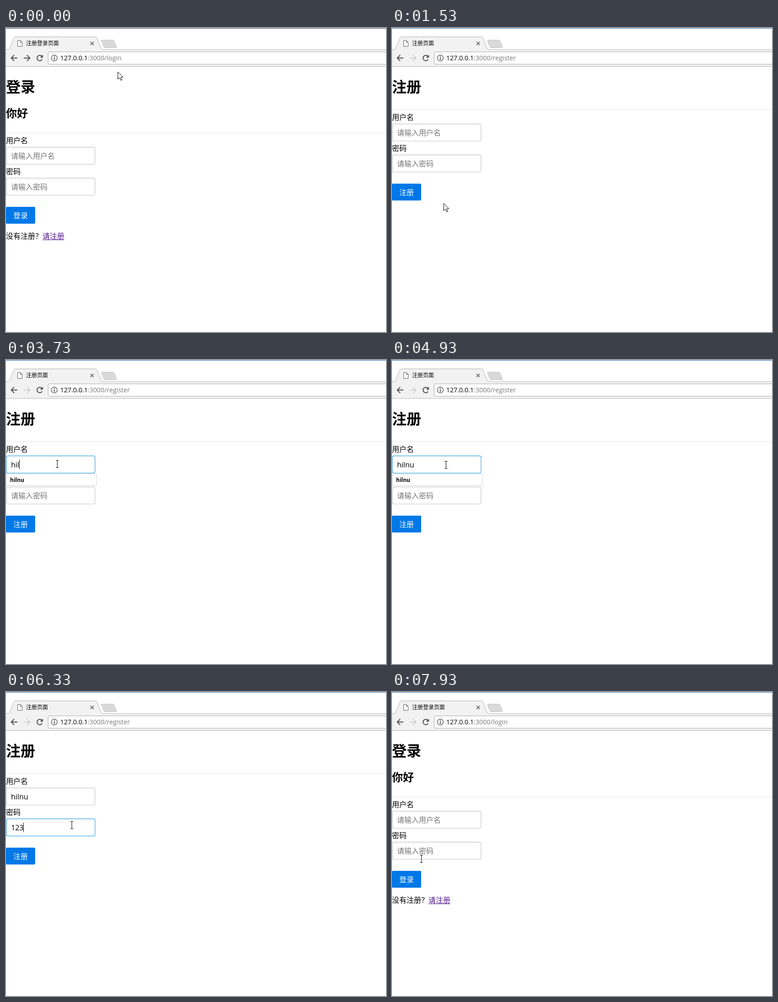
An HTML page with a canvas for the animation above (8000 ms loop, 834 by 668 pixels).

```html
<!DOCTYPE html>
<html lang="zh-CN">
<head>
<meta charset="utf-8">
<title>注册登录</title>
<style>
  html, body { margin: 0; width: 100%; height: 100%; overflow: hidden; background: #fff; }
  canvas { display: block; }
</style>
</head>
<body>
<canvas id="stage" width="834" height="668"></canvas>
<script>
const ctx = document.getElementById('stage').getContext('2d');
const LOOP = 8000, TICK = 1000 / 15, CARET_PERIOD = 530;
const USER = 'hilnu', PASSWORD = '123';
const REGISTER_AT = 1300, LOGIN_AT = 7400;

// Pointer stops: time, x, y
const stops = [
  [0, 245, 96], [60, 245, 96], [933, 119, 466], [1133, 118, 457], [1260, 118, 457],
  [1933, 103, 258], [2067, 112, 228], [4900, 112, 228], [5200, 289, 284],
  [5270, 288, 283], [5533, 144, 292], [6330, 144, 292], [6560, 285, 270],
  [6730, 170, 372], [6800, 130, 366], [7067, 57, 362], [7270, 57, 363], [7933, 64, 366], [8000, 64, 366]
];
const userField = { text: USER, hint: '请输入用户名', focus: 2200, blur: 5270, keys: [3330, 3530, 3730, 3930, 4130] };
const passField = { text: PASSWORD, hint: '请输入密码', focus: 5730, blur: 6600, keys: [6000, 6200, 6330] };

const shapes = {
  arrow: new Path2D('M0 0V16L4 12.5L6.5 18.5L9 17.5L6.5 11.5H11.5Z'),
  hand: new Path2D('M-1.5 13V1.5Q0-1 1.5 1.5V7.5Q3.5 5.5 4.5 8Q6.5 6.5 7.5 9Q9.5 7.5 10.5 10.5V15Q10.5 18 8.5 20Q7 22.5 3 22.5Q-1 22.5-2.5 19L-5.5 14Q-6 11-4 11.5Z'),
  knuckles: new Path2D('M1.5 7.5V11M4.5 8V12M7.5 9V12'),
  beam: new Path2D('M-3-8H3M0-8V8M-3 8H3')
};

function text(str, x, y, size = 16, color = '#000', weight = 400) {
  ctx.font = `${weight} ${size}px "Open Sans", "Noto Sans CJK SC", sans-serif`;
  ctx.fillStyle = color;
  ctx.fillText(str, x, y);
  return ctx.measureText(str).width;
}
function rect(x, y, w, h, color) {
  ctx.fillStyle = color;
  ctx.fillRect(x, y, w, h);
}
function line(d, color, width = 1, fill) {
  const path = new Path2D(d);
  if (fill) { ctx.fillStyle = fill; ctx.fill(path); }
  ctx.strokeStyle = color;
  ctx.lineWidth = width;
  ctx.stroke(path);
}
function roundBox(x, y, w, h, r, stroke, fill = '#fff') {
  ctx.beginPath();
  ctx.roundRect(x, y, w, h, r);
  ctx.fillStyle = fill;
  ctx.fill();
  if (stroke) { ctx.strokeStyle = stroke; ctx.lineWidth = 1; ctx.stroke(); }
}

function pointerAt(t) {
  const i = stops.findIndex((s, n) => n && t <= s[0]);
  const [t0, x0, y0] = stops[i - 1], [t1, x1, y1] = stops[i];
  const p = (t - t0) / (t1 - t0), e = p * p * (3 - 2 * p);
  return { x: Math.round(x0 + (x1 - x0) * e), y: Math.round(y0 + (y1 - y0) * e) };
}
const inside = (p, x, y, w, h) => p.x >= x && p.x < x + w && p.y >= y && p.y < y + h;

function browser(title, path, canForward, active) {
  rect(0, 0, 834, 1, active ? '#1a65a6' : '#2b3a4b');
  rect(0, 47, 834, 37, '#f2f2f2');
  rect(0, 47, 834, 1, '#b5b5b5');
  rect(0, 84, 834, 1, '#b5b5b5');
  line('M4 47.5Q7 47.5 8 45L17.5 22Q18.5 19.5 21 19.5H196Q198.5 19.5 199.5 22L209 45Q210 47.5 213 47.5', '#b0b0b0', 1, '#f2f2f2');
  rect(6, 47, 205, 2, '#f2f2f2');
  line('M211 26.5H234Q236.5 26.5 237.5 29L242.5 41Q243 43.5 241 43.5H218Q215.5 43.5 214.5 41L209.5 29Q209 26.5 211 26.5Z', '#c6c6c6', 1, '#d9d9d9');
  line('M25.5 27.5H31.5L35.5 31.5V40.5H25.5ZM31.5 27.5V31.5H35.5', '#5a5a5a', 1, '#fff');
  line('M185.5 30.5L192.5 37.5M192.5 30.5L185.5 37.5', '#5a5a5a', 1.7);
  text(title, 44, 38, 12);

  line('M25 66H12M18 59.5L11.5 66L18 72.5', '#505050', 2);
  line('M39 66H52M46 59.5L52.5 66L46 72.5', canForward ? '#505050' : '#cfcfcf', 2);
  line('M79.3 69A6 6 0 1 1 78.5 61.8', '#505050', 2);
  line('M81 59V65H75Z', '#505050', .3, '#505050');
  roundBox(92.5, 52.5, 760, 27, 2.5, '#a9a9a9');
  line('M112.5 66A6.5 6.5 0 1 1 99.5 66A6.5 6.5 0 1 1 112.5 66', '#5a5a5a', 1.4);
  rect(105, 65, 2, 5, '#5a5a5a');
  rect(105, 62, 2, 2, '#5a5a5a');
  const w = text('127.0.0.1', 119, 71, 14.3);
  text(':3000' + path, 119 + w, 71, 14.3, '#7a7a7a');
}

function input(y, field, t) {
  const focused = t >= field.focus && t < field.blur;
  roundBox(.5, y + .5, 195, 38, 3.5, focused ? '#129fea' : '#ccc');
  ctx.save();
  ctx.clip();
  ctx.shadowColor = '#ccc';
  ctx.shadowBlur = 3;
  ctx.shadowOffsetY = 1;
  ctx.stroke();
  ctx.restore();
  const typed = field.text.slice(0, field.keys.filter(k => t >= k).length);
  const width = typed ? text(typed, 11, y + 26) : 0;
  if (!typed) text(field.hint, 11, y + 26, 16, '#757575');
  if (focused) {
    const since = t - Math.max(...[field.focus, ...field.keys].filter(k => k <= t));
    if (Math.floor(since / CARET_PERIOD) % 2 === 0) rect(Math.round(11 + width), y + 9, 1, 21, '#000');
  }
  return focused && typed;
}

function button(y, label, hover) {
  roundBox(0, y, 64, 37, 2, null, '#0078e7');
  if (hover) {
    const shade = ctx.createLinearGradient(0, y, 0, y + 37);
    shade.addColorStop(0, 'rgba(0,0,0,0)');
    shade.addColorStop(.4, 'rgba(0,0,0,.05)');
    shade.addColorStop(1, 'rgba(0,0,0,.1)');
    roundBox(0, y, 64, 37, 2, null, shade);
  }
  text(label, 16, y + 25, 16, '#fff');
}

function cursor(kind, { x, y }) {
  ctx.save();
  ctx.translate(x + .5, y + .5);
  ctx.lineWidth = 1;
  ctx.strokeStyle = '#000';
  ctx.fillStyle = '#fff';
  if (kind !== 'beam') ctx.fill(shapes[kind]);
  ctx.stroke(shapes[kind]);
  if (kind === 'hand') ctx.stroke(shapes.knuckles);
  ctx.restore();
}

function draw(t) {
  const register = t >= REGISTER_AT && t < LOGIN_AT;
  const top = register ? 179 : 230;
  const label = register ? '注册' : '登录';
  const formTime = register ? t : 0;
  const pointer = pointerAt(Math.floor((t + 5) / TICK) * TICK);
  const onButton = inside(pointer, 0, top + 163, 64, 37);
  const onLink = !register && inside(pointer, 80, 448, 48, 20);
  const onInput = inside(pointer, 0, top + 31, 196, 39) || inside(pointer, 0, top + 99, 196, 39);

  rect(0, 0, 834, 668, '#fff');
  browser(register ? '注册页面' : '注册登录页面', register ? '/register' : '/login', t < REGISTER_AT, t >= 1065);
  text(label, 0, 141, 32, '#000', 700);
  if (!register) text('你好', 0, 196, 24, '#000', 700);
  rect(0, top, 834, 1, '#e4e4e4');
  text('用户名', 0, top + 23);
  text('密码', 0, top + 91);
  const suggest = input(top + 31, userField, formTime);
  input(top + 99, passField, formTime);
  if (suggest) {
    roundBox(.5, top + 71.5, 198, 25, 0, '#d4d4d4');
    text(USER, 9, top + 89, 12, '#000', 700);
  }
  button(top + 163, label, onButton);
  if (!register) {
    text('没有注册？', 0, 463);
    text('请注册', 80, 463, 16, '#551a8b');
    rect(80, 465, 48, 1, '#551a8b');
  }
  cursor(onButton || onLink ? 'hand' : onInput ? 'beam' : 'arrow', pointer);
}

function frame() {
  draw(performance.now() % LOOP);
  requestAnimationFrame(frame);
}
frame();
</script>
</body>
</html>
```
